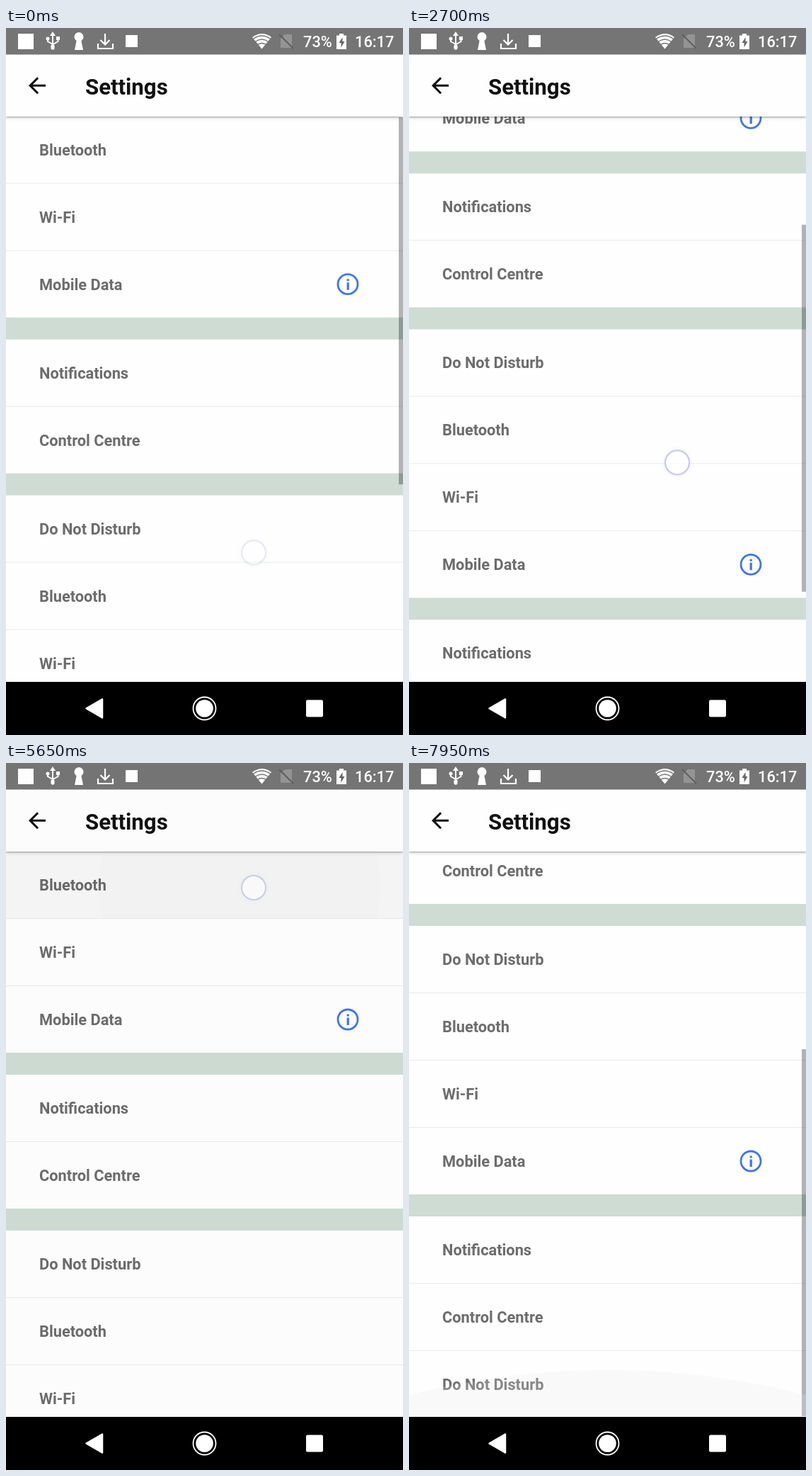
An HTML page that plays this animation: 561x998 px, repeating every 8 s.

```html
<!DOCTYPE html>
<html lang="en">
<head>
<meta charset="utf-8">
<title>Settings list</title>
<style>
@property --s { syntax: "<number>"; inherits: true; initial-value: 0; }
html, body { margin: 0; width: 100%; height: 100%; overflow: hidden; background: #000; }
body { font-family: Roboto, sans-serif; }
#stage { position: relative; width: 561px; height: 998px; overflow: hidden; }
#stage > *, .view > * { position: absolute; }
#stage * { animation-duration: 8s; animation-iteration-count: infinite; animation-timing-function: linear; }

.view { left: 0; top: 125px; width: 561px; height: 798px; overflow: hidden; background: #fdfefd; animation-name: scroll; }
.list { left: 0; top: 0; width: 100%; transform: translateY(calc(var(--s) * -1px)); }
.row { position: relative; height: 94px; overflow: hidden; color: #6c6c6c; font: 700 21.8px/96px Roboto, sans-serif; }
.row + .row { border-top: 1px solid #e8eae9; }
.row span { position: absolute; left: 47px; }
.row svg { position: absolute; left: 465px; top: 29px; }
.gap { height: 31px; background: #cedcd4; }
.bar { right: 0; top: 1px; width: 6px; height: 518px; background: rgba(0,0,0,.3); transform: translateY(calc(var(--s) * .6465px)); animation-name: bar; }
.glow { left: 0; bottom: 0; width: 561px; height: 66px; overflow: hidden; animation-name: glow; transform-origin: bottom; }
.glow::after { content: ""; position: absolute; left: -856px; top: 0; width: 2274px; height: 2274px; border-radius: 50%; background: rgba(230,230,230,.22); }

.press { position: absolute; inset: 0; background: rgba(0,0,0,.03); opacity: 0; }
.press i { position: absolute; width: 292px; height: 292px; margin: -146px; border-radius: 50%; background: rgba(0,0,0,.012); }
.p1 { animation-name: press1; } .p1 i { left: 354px; top: 64px; animation-name: spread1; }
.p2 { animation-name: press2; } .p2 i { left: 325px; top: 84px; animation-name: spread2; }
.p3 { animation-name: press3; } .p3 i { left: 330px; top: 50px; animation-name: spread3; }

.head { left: 0; top: 37px; width: 561px; height: 88px; background: #fdfefd; box-shadow: 0 1px 2px rgba(0,0,0,.3), 0 2px 5px rgba(0,0,0,.14); }
.chrome { left: 0; top: 0; }
.dim { left: 0; top: 0; width: 561px; height: 923px; background: rgba(0,0,0,.6); animation-name: dim; }
.dialog { left: 39px; top: 358px; width: 483px; height: 244px; border-radius: 3px; background: #fff; box-shadow: 0 12px 28px rgba(0,0,0,.3); animation-name: dialog; }
.dialog b { position: absolute; font-weight: 500; white-space: nowrap; }
.dialog .t { left: 38px; top: 32px; font-size: 31.2px; line-height: 37px; color: #212121; }
.dialog .ok { left: 401px; top: 189px; font-size: 21.8px; line-height: 26px; color: #009688; }
.finger { left: -18px; top: -18px; width: 36px; height: 36px; box-sizing: border-box; border-radius: 50%; border: 2px solid rgba(176,178,220,.75); background: rgba(255,255,255,.68); box-shadow: 0 0 5px 1px rgba(225,226,240,.45); animation-name: move, touch; }
.tap { left: 447px; top: 550px; border-color: rgba(255,255,255,.15); background: rgba(255,255,255,.45); box-shadow: 0 0 0 4px rgba(255,255,255,.09); animation-name: tap; }

@keyframes scroll {
  0% { --s: 0 } .625% { --s: 18 } 1.25% { --s: 70 } 1.875% { --s: 148 } 2.5% { --s: 242 } 3.125% { --s: 335 } 3.75% { --s: 412 }
  4.1%, 24.375% { --s: 430 } 25.625% { --s: 417 } 26.875% { --s: 397 } 28.75% { --s: 358 } 31.25% { --s: 300 } 33.75% { --s: 235 }
  35.625% { --s: 183 } 36.875% { --s: 150 } 38.125% { --s: 119 } 39.375% { --s: 97 } 40% { --s: 90 } 41.25%, 56% { --s: 86 }
  58.125% { --s: 46 } 59.375% { --s: 20 } 60.625%, 93.125% { --s: 0 }
  94.375% { --s: 15 } 95% { --s: 45 } 95.625% { --s: 100 } 96.25% { --s: 170 } 96.875% { --s: 248 } 97.5% { --s: 325 } 98.125% { --s: 392 } 98.6%, 100% { --s: 430 }
}
@keyframes bar {
  0%, 10.625% { opacity: 1 } 13.125%, 24.3% { opacity: 0 } 24.4%, 43.5% { opacity: 1 } 46.5%, 55.9% { opacity: 0 }
  56%, 60.9% { opacity: 1 } 63.75%, 93% { opacity: 0 } 93.1%, 100% { opacity: 1 }
}
@keyframes glow {
  0%, 4.4% { opacity: 0; transform: scaleY(.2) } 6.25% { opacity: .8; transform: scaleY(.9) } 10.6% { opacity: 0; transform: scaleY(.3) }
  98.6% { opacity: 0; transform: scaleY(.2) } 99.375%, 100% { opacity: 1; transform: none }
}
@keyframes press1 { 0%, 21% { opacity: 0 } 23%, 28.8% { opacity: 1 } 31.25%, 100% { opacity: 0 } }
@keyframes spread1 { 0%, 21% { transform: scale(.1) } 28.75% { transform: none } 32%, 100% { transform: scale(1.4) } }
@keyframes press2 { 0%, 54.375% { opacity: 0 } 55.625%, 58.2% { opacity: 1 } 60.5%, 100% { opacity: 0 } }
@keyframes spread2 { 0%, 54.375% { transform: scale(.1) } 58.125% { transform: scale(.94) } 61%, 100% { transform: scale(1.3) } }
@keyframes press3 { 0%, 67.8% { opacity: 0 } 69%, 71.5% { opacity: 1.0 } 74%, 100% { opacity: 0 } }
@keyframes spread3 { 0%, 67.8% { transform: scale(.1) } 72.5%, 100% { transform: scale(2.2) } }
@keyframes dim { 0%, 70.6% { opacity: 0 } 73.4%, 78.125% { opacity: 1 } 81.25%, 100% { opacity: 0 } }
@keyframes dialog { 0%, 70.8% { opacity: 0 } 73.4%, 78.125% { opacity: 1 } 79.375% { opacity: .14 } 80%, 100% { opacity: 0 } }
@keyframes move {
  0% { transform: translate(350px, 741px) } .625% { transform: translate(354px, 711px) } 1.25% { transform: translate(365px, 659px) }
  1.875% { transform: translate(380px, 581px) } 2.5% { transform: translate(397px, 487px) } 3.125% { transform: translate(414px, 394px) }
  3.75% { transform: translate(427px, 312px) } 4.375%, 6.5% { transform: translate(436px, 239px) }
  6.6%, 23% { transform: translate(371px, 406px) } 24.375% { transform: translate(372px, 418px) } 28.75% { transform: translate(374px, 490px) }
  31.25% { transform: translate(376px, 548px) } 33.75% { transform: translate(379px, 613px) } 35.625% { transform: translate(382px, 665px) } 37.5% { transform: translate(385px, 705px) }
  37.6%, 54.375% { transform: translate(344px, 540px) } 56% { transform: translate(343px, 552px) } 58.125% { transform: translate(340px, 592px) } 60.625%, 62.5% { transform: translate(338px, 638px) }
  62.6%, 75% { transform: translate(350px, 176px) }
  75.1%, 92% { transform: translate(352px, 896px) } 93.125% { transform: translate(353px, 884px) } 94.375% { transform: translate(356px, 869px) }
  95.625% { transform: translate(372px, 784px) } 96.875% { transform: translate(398px, 636px) } 98.125%, 100% { transform: translate(425px, 492px) }
}
@keyframes touch {
  0% { opacity: .4 } 1.25%, 3.5% { opacity: 1 } 4.375% { opacity: .75 } 6.25%, 15.6% { opacity: 0 } 18%, 35.6% { opacity: 1 } 37.5%, 49.5% { opacity: 0 }
  52%, 60.6% { opacity: 1 } 62.4%, 66.6% { opacity: 0 } 68%, 70.3% { opacity: 1 } 72.5%, 84% { opacity: 0 } 87%, 96.9% { opacity: 1 } 98.3%, 100% { opacity: 0 }
}
@keyframes tap { 0%, 74.8% { opacity: 0 } 76.9%, 79.4% { opacity: 1 } 81.25%, 100% { opacity: 0 } }
</style>
</head>
<body>
<div id="stage">
  <div class="view">
    <div class="list" id="list"></div>
    <div class="bar"></div>
    <div class="glow"></div>
  </div>
  <div class="head"></div>
  <svg class="chrome" width="561" height="998" font-family="Roboto, sans-serif">
    <rect width="561" height="37.5" fill="#757575"/>
    <g fill="#fff">
      <rect x="17" y="8" width="22" height="22"/>
      <rect x="169" y="10" width="17" height="17"/>
      <!-- usb -->
      <path d="M66 5l4 6h-8zM63.500 27a2.700 2.700 0 1 0 5 0 2.700 2.700 0 1 0-5 0zM71 12h5v5h-5z"/>
      <circle cx="59" cy="15" r="2.500"/>
      <path d="M66 9v18M59 15v4l7 4M73.500 15v4l-7 4" fill="none" stroke="#fff" stroke-width="2"/>
      <!-- keyhole -->
      <circle cx="103" cy="12.500" r="6.500"/>
      <path d="M100 16h6l3 15H97z"/>
      <!-- download -->
      <path d="M140 8v15M133.500 17l6.500 6.500 6.500-6.500M130 22v7h21v-7" fill="none" stroke="#fff" stroke-width="2.200"/>
      <!-- wifi -->
      <path d="M348 13q14-10 27 0L361.500 29.500z"/>
      <path d="M349 15.500q12.500-9 25 0M352 19.500q9.500-7 19 0M355.500 23.500q6-4 12 0" fill="none" stroke="#757575" stroke-width="1.300"/>
      <!-- no sim -->
      <path d="M394 9h10v19h-16V15z" fill="#949494"/>
      <path d="M386 9l20 20" stroke="#606060" stroke-width="2.200"/>
      <!-- battery -->
      <path d="M471 8h6v2.500h4V30h-14V10.500h4z"/>
      <path d="M475.500 13l-5 8h3v6.500l5-8.500h-3z" fill="#666"/>
      <g font-size="21.800" font-weight="500">
        <text x="420" y="27">73%</text>
        <text x="493" y="27">16:17</text>
      </g>
    </g>
    <path transform="translate(26 63.300) scale(1.500)" d="M20 11H7.830l5.590-5.590L12 4l-8 8 8 8 1.410-1.410L7.830 13H20z" fill="#111"/>
    <text x="112" y="94" font-size="31.200" font-weight="700" fill="#111">Settings</text>
    <rect y="923" width="561" height="75"/>
    <g fill="#fff">
      <path d="M113.500 960.500L136 947.500V973.500z" stroke="#fff" stroke-width="2.500" stroke-linejoin="round"/>
      <circle cx="280.500" cy="960.500" r="12.300"/>
      <circle cx="280.500" cy="960.500" r="16" fill="none" stroke="#fff" stroke-width="1.800"/>
      <rect x="424" y="948.500" width="24" height="24" rx="2"/>
    </g>
  </svg>
  <div class="dim"></div>
  <div class="dialog"><b class="t">First row clicked</b><b class="ok">OK</b></div>
  <div class="finger"></div>
  <div class="finger tap"></div>
</div>
<script>
const sections = [
  ["Bluetooth", "Wi-Fi", "Mobile Data"],
  ["Notifications", "Control Centre"],
  ["Do Not Disturb", "Bluetooth", "Wi-Fi", "Mobile Data"],
  ["Notifications", "Control Centre", "Do Not Disturb"]
];
// section-row of each pressed row and its ripple class
const presses = { "2-1": "p1", "1-1": "p2", "0-0": "p3" };
const info = `<svg width="36" height="36"><circle cx="18" cy="18" r="14" fill="none" stroke="#4175ea" stroke-width="2.8"/>
  <path d="M16.600 10.500h3.200v3h-3.200zM16.600 15.500h3.200v10.500h-3.200z" fill="#4175ea"/></svg>`;
const row = (name, key) => `<div class="row"><span>${name}</span>` +
  (presses[key] ? `<div class="press ${presses[key]}"><i></i></div>` : "") +
  (name === "Mobile Data" ? info : "") + `</div>`;
document.getElementById("list").innerHTML = sections
  .map((names, i) => `<div>${names.map((n, j) => row(n, i + "-" + j)).join("")}</div>`)
  .join('<div class="gap"></div>');
</script>
</body>
</html>
```
